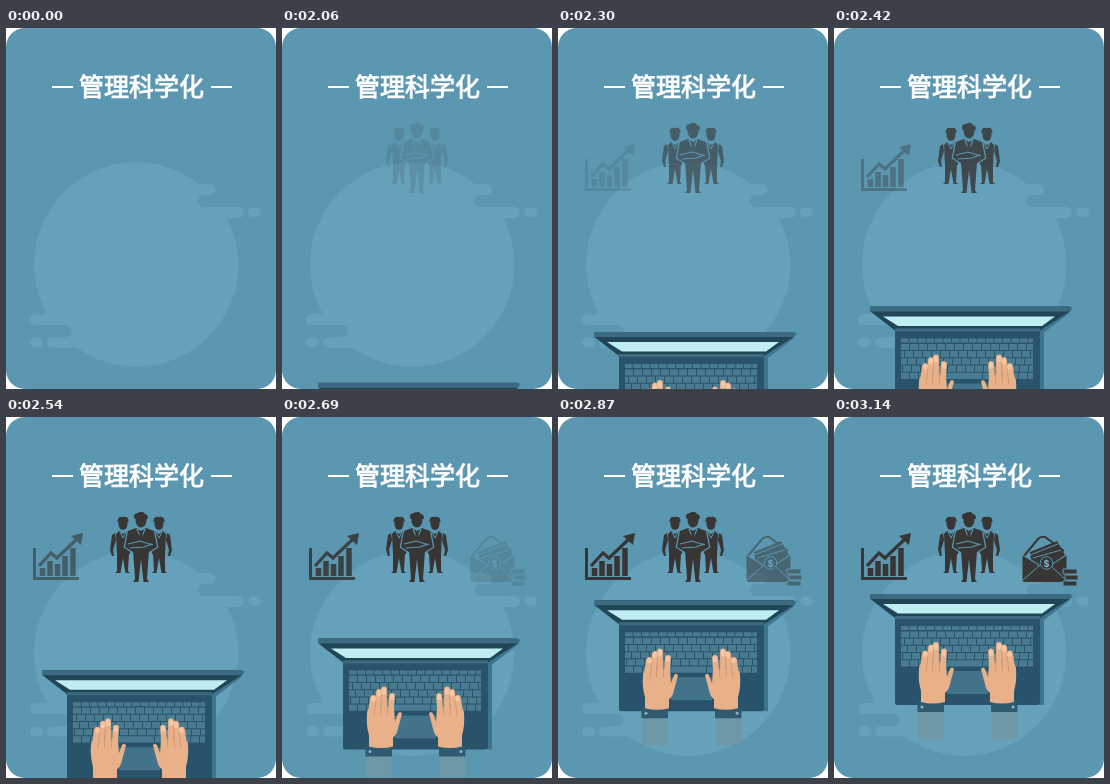
An HTML page for the animation above (4.53 s loop, 270 by 361 pixels).

```html
<!DOCTYPE html>
<html lang="zh">
<head>
<meta charset="utf-8">
<style>
html, body { margin: 0; width: 100%; height: 100%; overflow: hidden; background: #fff; }
svg { display: block; width: 270px; height: 361px; }
text { font: 400 25px 'Noto Sans CJK SC', 'Noto Sans CJK', sans-serif; fill: #fff; }
.title { stroke: #fff; stroke-width: .9; }
.icon { fill: #373635; }
.line { fill: none; stroke: #373635; }
.gap { fill: none; stroke: #5b97b1; }
.coin { font: 700 9px Inter, sans-serif; fill: #8ab8cc; }
</style>
</head>
<body>
<svg viewBox="0 0 270 361">
  <defs>
    <clipPath id="card"><rect width="270" height="361" rx="19"/></clipPath>
    <g id="hand">
      <path d="M84 287h25.500v35H84z" fill="#6c98a8"/>
      <path d="M83.500 285h26.500v10H83.500z" fill="#2f5a70"/>
      <circle cx="88" cy="290" r="1.500" fill="#8db4c8"/>
      <path d="M85 252q0-5 4-6h23l1 14 3-8q2-3 4 0l-4 15q-1 6-5 9v9q-12 3-24 0v-11q-3-10-2-22z" fill="#e8b189"/>
      <path d="M88.500 255L91 236.500M95 254L97 230.500M102 254V228M108.500 254L110 234.500"
        fill="none" stroke="#e8b189" stroke-width="5.800" stroke-linecap="round"/>
      <path d="M91.500 238V236.500M97 233V230.500M102 231V228M110 237V234.500"
        fill="none" stroke="#f4c7a6" stroke-width="4" stroke-linecap="round"/>
      <path d="M92 255L94 239M98.500 254L99.500 233M105.300 254L106 236"
        fill="none" stroke="#cf9470" stroke-width=".8"/>
    </g>
    <g id="man">
      <ellipse cx="117" cy="107" rx="4.500" ry="6"/>
      <path d="M111.500 105q0-6 5.500-5 6-1 5.500 5z"/>
      <path d="M113 114l4 3 4-3 5 3-2 20h-13l-1-20zM109 116l-3 2-2 15 2 6h2l-1-6 3-10z"/>
      <path d="M111 137h12l-1 17 2 2h-4.500l-2.500-15-2.500 15H109l2-2z"/>
      <path d="M114 115l3 6 3-6" class="gap"/>
    </g>
  </defs>

  <g clip-path="url(#card)">
    <path d="M0 0h270v361H0z" fill="#5b97b1"/>
    <g fill="#65a1bb">
      <circle cx="130.200" cy="236.500" r="102.200"/>
      <rect x="168" y="156" width="42" height="11" rx="5.500"/>
      <rect x="186" y="179" width="52" height="11" rx="5.500"/>
      <rect x="242" y="179.500" width="13" height="9.500" rx="4.700"/>
      <rect x="24" y="286" width="50" height="11" rx="5.500"/>
      <rect x="41" y="309.500" width="50" height="10" rx="5"/>
      <rect x="24" y="309.500" width="13" height="10" rx="5"/>
    </g>
    <g fill="#5b97b1">
      <rect x="192" y="167" width="40" height="12" rx="6"/>
      <rect x="24" y="297" width="42" height="12" rx="6"/>
    </g>

    <path d="M46 59h21M205 59h21" stroke="#fff" stroke-width="2"/>
    <text class="title" x="73" y="68">管理科学化</text>

    <g id="people" class="icon">
      <use href="#man"/>
      <use href="#man" transform="matrix(-1 0 0 1 270 0)"/>
      <path d="M130 111l5 3 5-3 8 3 3 16-8 5H127l-8-5 3-16z" class="gap" stroke-width="2.500"/>
      <ellipse cx="135" cy="103" rx="5.500" ry="7.500"/>
      <path d="M128.500 102q-2-6 3.500-6 4-3 7 1 4 1 2.500 5z"/>
      <path d="M130 111l5 3 5-3 8 3 3 16-8 5H127l-8-5 3-16z"/>
      <path d="M127 134h16l-2 28 2 3h-5.500l-2.500-23-2.500 23H127l2-3z"/>
      <path d="M131 112l4 10 4-10M122 127l12-3 13 4M124 131l14-1 8-3" class="gap" stroke-width="1.200"/>
      <path d="M134 114h2l1 7-2 3-2-3z"/>
    </g>

    <g id="chart">
      <path d="M28.500 131v30.500H73" class="line" stroke-width="3"/>
      <path d="M36.500 159v-8M44 159v-15M51.500 159v-12M59 159v-20M67 159v-28" class="line" stroke-width="5.500"/>
      <path d="M33 149L45 136 51 141 72 121" class="line" stroke-width="3.200"/>
      <path d="M65 119l12-3-2 12z" class="icon"/>
    </g>

    <g id="mail">
      <path d="M190 139L204 122q3-3 7-2L230 134" class="line" stroke-width="2"/>
      <path d="M196 135L223 124 231 138 211 151 197 142z" class="icon"/>
      <path d="M196 138L224 127M199 141L227 133" class="gap" stroke-width="1"/>
      <path d="M188.500 138L210 150 232.500 138V163q0 2-2 2H190.500q-2 0-2-2z" class="icon"/>
      <path d="M188.500 138L206 149M232.500 138L217 148M189 163L205 149M232 163L217 149" class="gap" stroke-width="1"/>
      <circle cx="212.500" cy="146" r="6.300" class="icon" stroke="#5b97b1"/>
      <text class="coin" x="212.500" y="149.500" text-anchor="middle">$</text>
      <path d="M229 152h14v5h-14zM231 158h13v5h-13zM229 164h14v5h-14z" class="icon" stroke="#5b97b1"/>
    </g>

    <g id="laptop">
      <path d="M235 177l4 1-4 6-25 19v85h-4v-87z" fill="#3f768e"/>
      <path d="M36.500 177H235.500V182L206 201H61L36.500 182z" fill="#1f4557"/>
      <path d="M36.500 177H235.500V182H36.500z" fill="#3c6a80"/>
      <path d="M49 187H221L208 196.500H64z" fill="#bfeef2"/>
      <path d="M61 199H206V286q0 2-2 2H63q-2 0-2-2z" fill="#29536a"/>
      <path d="M61 199H206V202H61z" fill="#3c6a80"/>
      <g id="keys" fill="none" stroke="#487a90"></g>
      <path d="M113 254h41v23h-41z" fill="#42738a"/>
      <use href="#hand"/>
      <use href="#hand" transform="matrix(-1 0 0 1 267 0)"/>
    </g>
  </g>
</svg>
<script>
const LOOP = 4530, START = 2060, STEP = 30, FADE = 540;
const part = id => document.getElementById(id);
const ramp = (t, from, length) => Math.min(1, Math.max(0, (t - from) / length));

// Dashed strokes form the staggered key rows.
const keyRow = (y, height, dash, offset = 0) =>
  `<path d="M67 ${y}H199" stroke-width="${height}" stroke-dasharray="${dash}" stroke-dashoffset="${offset}"/>`;
part('keys').innerHTML = keyRow(211, 4, '7.5 1') +
  [0, 5, 2, 7].map((offset, i) => keyRow(217.5 + i * 7.2, 6.2, '8 1', offset)).join('') +
  keyRow(246.3, 6.2, '8 1 8 1 8 1 54 1 8 1 8 1 8 1 8 1 8 1');

function draw(now) {
  const time = now % LOOP;
  const t = time < START ? 0 : START + Math.floor((time - START) / STEP) * STEP;
  part('people').style.opacity = ramp(t, 1980, FADE);
  part('chart').style.opacity = ramp(t, 2220, FADE);
  part('mail').style.opacity = ramp(t, 2600, FADE);
  part('laptop').setAttribute('transform', `translate(0 ${184 * (1 - ramp(t, 2030, 870))})`);
}

const began = performance.now();
function tick() {
  draw(performance.now() - began);
  requestAnimationFrame(tick);
}
tick();
</script>
</body>
</html>
```
